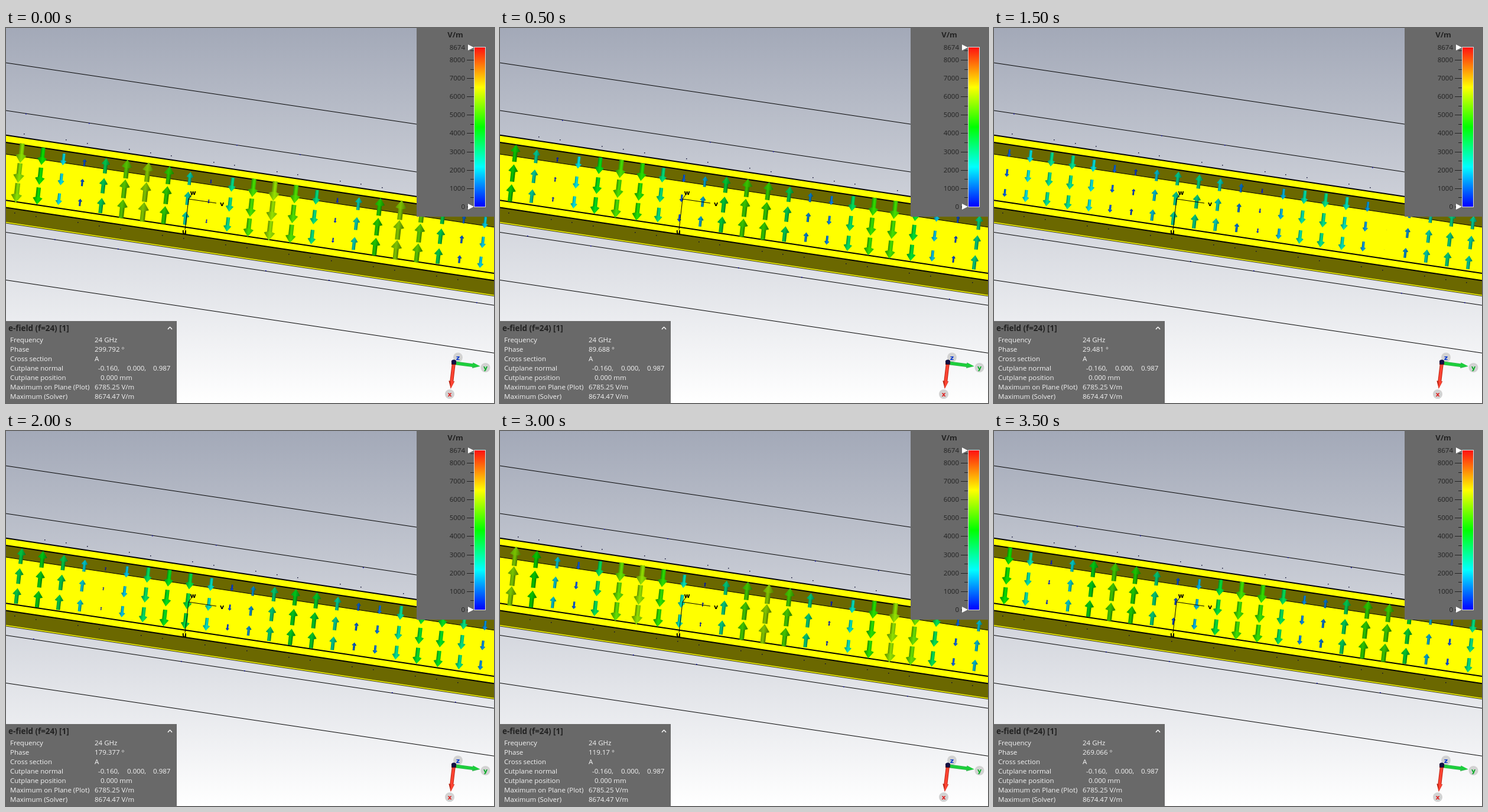
Write an HTML page with a canvas that moves like this. It is 826 px wide and 636 px high and loops after 4000 ms.

```html
<!DOCTYPE html>
<html lang="en">
<head>
<meta charset="utf-8">
<title>Field plot</title>
<style>
html, body { margin: 0; width: 826px; height: 636px; overflow: hidden; }
canvas { display: block; }
</style>
</head>
<body>
<canvas id="stage" width="826" height="636"></canvas>
<script>
const W = 826, H = 636, RAD = Math.PI / 180, SLOPE = 0.1498;
const SANS = '"Open Sans", "Noto Sans", sans-serif';
const PANEL = '#696969', DARK = '#222';
const ctx = document.getElementById('stage').getContext('2d');

function line(x1, y1, x2, y2, color = '#000', width = 1) {
  ctx.strokeStyle = color;
  ctx.lineWidth = width;
  ctx.beginPath();
  ctx.moveTo(x1, y1);
  ctx.lineTo(x2, y2);
  ctx.stroke();
}

function polygon(color, ...points) {
  ctx.fillStyle = color;
  ctx.beginPath();
  points.forEach(p => ctx.lineTo(...p));
  ctx.fill();
}

function text(str, x, y, font, color, align = 'left') {
  ctx.font = font;
  ctx.fillStyle = color;
  ctx.textAlign = align;
  ctx.fillText(str, x, y);
}

const slanted = (y, width) => line(0, y, W, y + SLOPE * W, '#000', width);

const band = (top, bottom, color) => polygon(color,
  [0, top], [W, top + SLOPE * W], [W, bottom + SLOPE * W], [0, bottom]);

// Blue, cyan, green, yellow, red across 0..8674 V/m
function fieldColor(value, light) {
  const s = value / 8674 * 4;
  const channel = v => Math.round(255 * light * Math.max(0, Math.min(1, v)));
  return `rgb(${channel(s - 2)},${channel(Math.min(s, 4 - s))},${channel(2 - s)})`;
}

function drawGuide() {
  const sky = ctx.createLinearGradient(0, 0, 0, H);
  sky.addColorStop(0, '#a3a9b8');
  sky.addColorStop(1, '#fff');
  ctx.fillStyle = sky;
  ctx.fillRect(0, 0, W, H);
  [59, 140, 346.5, 427.5].forEach(y => slanted(y, 1));
  band(182, 331, '#ff0');
  band(194, 214, '#6b6800');
  band(305, 329, '#6b6800');
  slanted(214, 1);
  slanted(331, 0.8);
  [181.7, 194, 292.3, 304.5].forEach(y => slanted(y, 2));
}

function fieldAt(col, phase) {
  const psi = 360 / 12.4 * (col - 5.9) * RAD, theta = (phase - 304) * RAD;
  return 5800 * (Math.cos(psi) * Math.cos(theta) + 0.52 * Math.sin(psi) * Math.sin(theta));
}

function arrow(x, y, value) {
  const size = Math.abs(value), len = 33.5 * Math.sqrt(size / 5800);
  const up = value > 0, light = up ? 0.76 : 0.88;
  const half = len * 0.28, shaft = len * 0.125, tip = -len / 2, neck = tip + len * 0.42;
  const shade = w => {
    const g = ctx.createLinearGradient(-w, 0, w, 0);
    g.addColorStop(0, fieldColor(size, light * 0.8));
    g.addColorStop(0.45, fieldColor(size, light));
    g.addColorStop(1, fieldColor(size, light * 0.62));
    return g;
  };
  ctx.save();
  ctx.translate(x, y);
  ctx.rotate(0.11 + (up ? 0 : Math.PI));
  ctx.fillStyle = shade(shaft);
  ctx.fillRect(-shaft, neck, 2 * shaft, len / 2 - neck);
  ctx.fillStyle = shade(half);
  ctx.beginPath();
  ctx.moveTo(0, tip);
  ctx.lineTo(half, neck - 1);
  ctx.quadraticCurveTo(0, neck + len * 0.1, -half, neck - 1);
  ctx.fill();
  ctx.restore();
}

function drawField(step, phase) {
  for (let col = 0; col < 23; col++) {
    const value = fieldAt(col, phase);
    for (let row = -3; row <= 3; row++) {
      const x = 22 + 35.68 * col - 3.8 * row, y = 246 + 5.35 * col + 33.7 * row;
      const ring = Math.abs(row);
      if (ring < 2) {
        arrow(x, y, value);
      } else if ((col * 37 + row * 11 + step * 17 + 33) % 10 < (ring === 2 ? 7 : 2)) {
        ctx.fillStyle = ring === 2 ? '#113' : '#00a';
        ctx.fillRect(Math.round(x), Math.round(y), 1.5, 1.5);
      }
    }
  }
}

function drawCutAxes() {
  line(309, 290, 303, 342);
  line(309, 290, 356, 297);
  line(309, 290, 314, 283);
  const font = 'bold 11px "DejaVu Sans", sans-serif';
  text('w', 316.5, 283, font, '#000', 'center');
  text('v', 365.5, 302, font, '#000', 'center');
  text('u', 302, 349, font, '#000', 'center');
}

function drawLegend() {
  ctx.fillStyle = PANEL;
  ctx.fillRect(695, 0, 131, 320);
  text('V/m', 760.5, 16, `bold 13px ${SANS}`, DARK, 'center');
  const bar = ctx.createLinearGradient(0, 33, 0, 303);
  ['#f11', '#ff0', '#0f0', '#0ff', '#00f'].forEach((c, i) => bar.addColorStop(i / 4, c));
  ctx.fillStyle = bar;
  ctx.fillRect(793, 33, 18, 271);
  ctx.strokeStyle = '#ddd';
  ctx.lineWidth = 1;
  ctx.strokeRect(792.5, 32.5, 19, 271);
  const label = (v, y) => text(v, 777, y + 4, `11.5px ${SANS}`, DARK, 'right');
  for (let v = 0; v <= 8500; v += 500) {
    const y = Math.round(303 - 270 * v / 8674), major = v % 1000 === 0;
    line(major ? 780 : 786, y + 0.5, 792, y + 0.5, DARK);
    if (major) label(v, y);
  }
  label(8674, 33);
  [33, 303].forEach(y => polygon('#fff', [782, y - 5], [792, y], [782, y + 5]));
}

function drawInfo(phase) {
  ctx.fillStyle = PANEL;
  ctx.fillRect(0, 497, 289, 139);
  text('e-field (f=24) [1]', 4, 514, `bold 13.4px ${SANS}`, DARK);
  line(274, 511, 277.5, 507, '#fff', 1.3);
  line(277.5, 507, 281, 511, '#fff', 1.3);
  const rows = [
    ['Frequency', [150, '24 GHz']],
    ['Phase', [150, +phase.toFixed(3) + ' °']],
    ['Cross section', [150, 'A']],
    ['Cutplane normal', [156, '-0.160,'], [205, '0.000,'], [249, '0.987']],
    ['Cutplane position', [160, '0.000 mm']],
    ['Maximum on Plane (Plot)', [150, '6785.25 V/m']],
    ['Maximum (Solver)', [150, '8674.47 V/m']]
  ];
  rows.forEach(([name, ...cells], i) => {
    for (const [x, str] of [[7, name], ...cells])
      text(str, x, 533 + 16 * i, `11.5px ${SANS}`, '#f4f4f4');
  });
}

function drawTriad() {
  const axis = (angle, len, color, edge) => {
    ctx.save();
    ctx.translate(758, 568);
    ctx.rotate(angle);
    polygon(edge, [0, -3], [len - 13, -3], [len - 13, -5], [len, 0], [len - 13, 5], [len - 13, 3], [0, 3]);
    polygon(color, [0, -2], [len - 13, -2], [len - 12, -4], [len, 0], [len - 13, 2], [0, 2]);
    ctx.restore();
  };
  const badge = (name, x, y, color) => {
    ctx.fillStyle = '#d2d2d2';
    ctx.beginPath();
    ctx.arc(x, y, 8, 0, 7);
    ctx.fill();
    text(name, x, y + 4, 'bold 11px "DejaVu Sans", sans-serif', color, 'center');
  };
  badge('z', 765, 558.5, '#03c');
  badge('y', 811.5, 576, '#0a2');
  badge('x', 751, 621, '#d22');
  axis(0.13, 45, '#1d3a', '#0a2c');
  axis(1.69, 44, '#f43', '#b21');
  polygon('#611', [754, 564], [762, 564], [762, 571], [754, 571]);
  ctx.fillStyle = '#114';
  ctx.beginPath();
  ctx.arc(758, 566.5, 4, 0, 7);
  ctx.fill();
}

function frame() {
  const step = Math.floor(performance.now() / 500) % 8;
  const phase = (299.792 + 149.8963 * step) % 360;
  drawGuide();
  drawField(step, phase);
  drawCutAxes();
  drawLegend();
  drawInfo(phase);
  drawTriad();
  requestAnimationFrame(frame);
}
frame();
</script>
</body>
</html>
```
